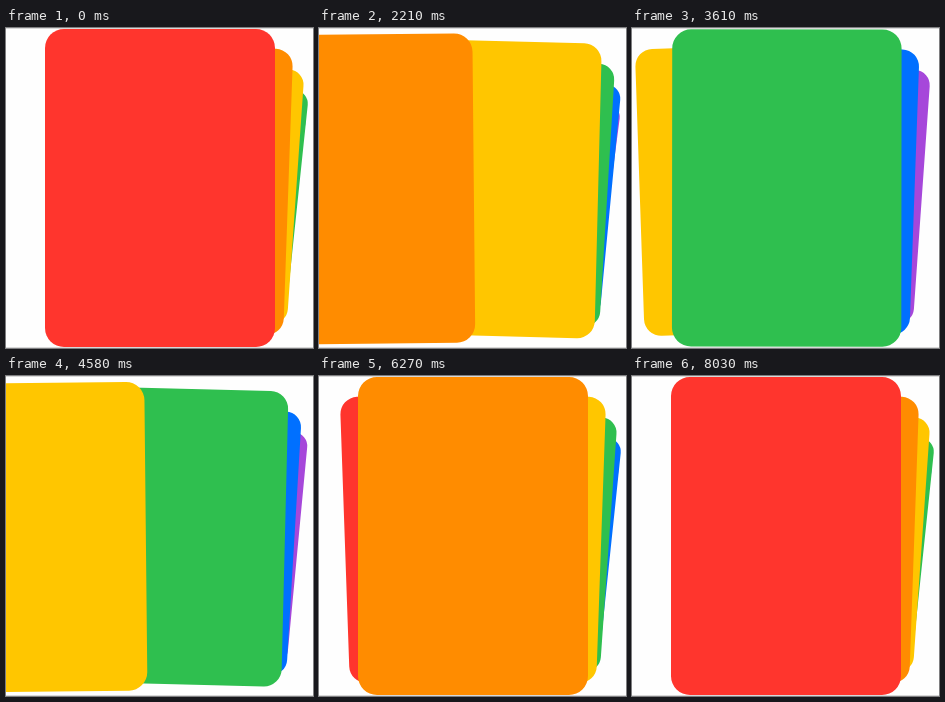
An HTML page for the animation above (8760 ms loop, 307x320 px).

```html
<!DOCTYPE html>
<html lang="en">
<head>
<meta charset="utf-8">
<title>Card deck</title>
<style>
  html, body { margin: 0; width: 100%; height: 100%; overflow: hidden; background: #fefefe; }
  #deck {
    position: relative; width: 307px; height: 320px; overflow: hidden;
    box-sizing: border-box; border: solid #d8d8d8; border-width: 1px 0;
  }
  .card {
    position: absolute; left: 39px; top: 0; width: 230px; height: 318px;
    border-radius: 19px;
  }
</style>
</head>
<body>
<div id="deck"></div>
<script>
const LOOP = 8760;
const STEP = 27.5;   // sideways distance between neighbouring cards
const SWING = 20;    // how far the leaving card swings out
const COLORS = ['#ff352d', '#ff8c00', '#ffc600', '#2fbf4f', '#0070ff', '#a647da'];

// Page turns: start in ms, direction, spring stiffness per second
const TURNS = [
  [805, 1, 11], [2135, 1, 13.5], [3325, 1, 19],
  [4405, -1, 14], [5565, -1, 16], [6595, -1, 11]
];

const deck = document.getElementById('deck');
const cards = COLORS.map(color => {
  const card = document.createElement('div');
  card.className = 'card';
  card.style.background = color;
  return deck.appendChild(card);
});

// Critically damped spring from 0 to 1
function spring(ms, k) {
  const x = Math.max(0, ms) * k / 1000;
  return 1 - (1 + x) * Math.exp(-x);
}

function pageAt(t) {
  return TURNS.reduce((page, [start, dir, k]) => page + dir * spring(t - start, k), 0);
}

function draw(now) {
  const page = pageAt(now % LOOP);
  const swing = Math.max(1, SWING * Math.abs(Math.sin(Math.PI * page)));
  cards.forEach((card, i) => {
    const d = i - page;
    const away = Math.abs(d);
    const x = d * STEP * (d < 0 && d > -1 ? swing : 1);
    card.style.transform = `rotate(${2 * d}deg) scale(${1 - 0.1 * away}) translateX(${x}px)`;
    card.style.zIndex = Math.round(1000 - 100 * away);
  });
  requestAnimationFrame(() => draw(performance.now()));
}

draw(0);
</script>
</body>
</html>
```
